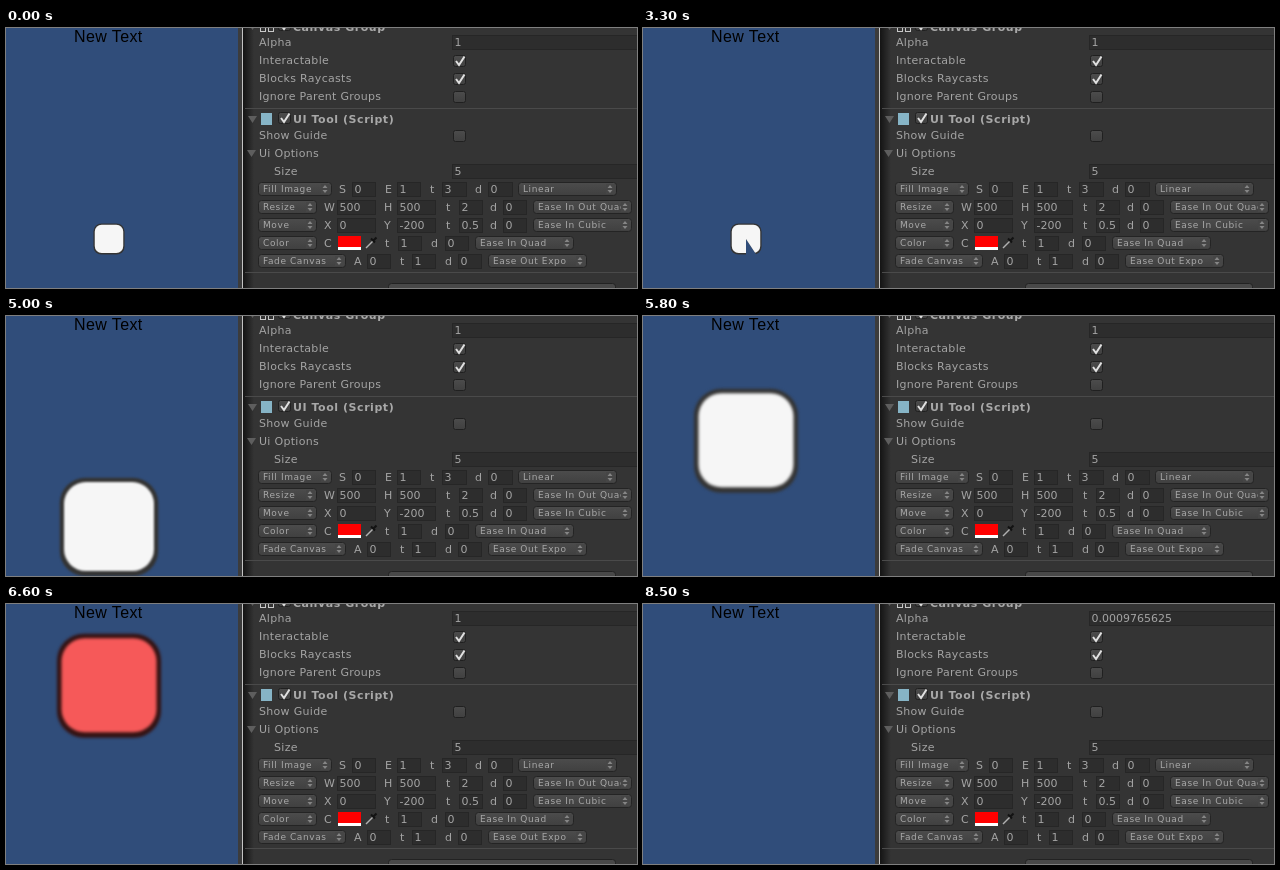
Write an HTML page that moves like this. It is 631 px wide and 260 px high and loops after 8600 ms.

```html
<!DOCTYPE html>
<html lang="en">
<head>
<meta charset="utf-8">
<title>UI Tool</title>
<style>
html, body { margin: 0; width: 100%; height: 100%; overflow: hidden; background: #343434; }
svg { display: block; }
text { white-space: pre; }
.scene { font: 16px "Liberation Sans", Arial, sans-serif; fill: #000; letter-spacing: .4px; }
.label, .value { font: 11px "DejaVu Sans", sans-serif; fill: #a4a4a4; }
.label { letter-spacing: .3px; }
.title { font: bold 11px "DejaVu Sans", sans-serif; fill: #a8a8a8; letter-spacing: .55px; }
.mini { font: 9px "DejaVu Sans", sans-serif; fill: #a8a8a8; letter-spacing: .6px; }
</style>
</head>
<body>
<svg id="stage" width="631" height="260" viewBox="0 0 631 260">
  <defs>
    <filter id="soft" filterUnits="userSpaceOnUse" x="-65" y="-65" width="130" height="130" color-interpolation-filters="sRGB">
      <feGaussianBlur stdDeviation="1.4"/>
    </filter>
    <clipPath id="wedge"><path id="sector"/></clipPath>
    <linearGradient id="face" x2="0" y2="1">
      <stop stop-color="#4c4c4c"/><stop offset="1" stop-color="#404040"/>
    </linearGradient>
    <linearGradient id="shade">
      <stop stop-color="#141414"/><stop offset="1" stop-color="#343434"/>
    </linearGradient>
  </defs>
  <rect width="232" height="260" fill="#304d7a"/>
  <text class="scene" x="68" y="14">New Text</text>
  <g id="button">
    <rect id="rim" x="-52" y="-52" width="104" height="104" rx="27" filter="url(#soft)"/>
    <rect id="body" x="-47.5" y="-47.5" width="95" height="94" rx="23" filter="url(#soft)"/>
  </g>
  <g id="panel"></g>
</svg>
<script>
const LOOP = 8600, STEP = 100;
const $ = id => document.getElementById(id);
const panel = $('panel');

function add(tag, attrs, content) {
  const el = document.createElementNS('http://www.w3.org/2000/svg', tag);
  for (const key in attrs) el.setAttribute(key, attrs[key]);
  if (content !== undefined) el.textContent = content;
  return panel.appendChild(el);
}
const rect = (x, y, width, height, fill, more) => add('rect', { x, y, width, height, fill, ...more });
const text = (x, y, content, kind = 'label') => add('text', { x, y, class: kind }, content);

function field(x, y, w, value) {
  rect(x + .5, y + .5, w - 1, 14, '#2d2d2d', { stroke: '#262626' });
  return text(x + 2.5, y + 11, value, 'value');
}

function checkbox(x, y, on) {
  rect(x + .5, y + .5, 12, 11, 'url(#face)', { stroke: '#202020', rx: 2 });
  if (on) add('path', { d: `M${x + 3} ${y + 6}l3 4L${x + 11.5} ${y + 1.5}`, fill: 'none', stroke: '#e0e0e0', 'stroke-width': 2 });
}

function popup(x, mid, w, label) {
  rect(x + .5, mid - 6.5, w - 1, 13, 'url(#face)', { stroke: '#242424', rx: 3 });
  text(x + 5, mid + 3, label, 'mini');
  const cx = x + w - 7;
  rect(cx - 4, mid - 5, 9, 10, '#464646');
  add('path', { d: `M${cx - 2.5} ${mid - 1}l2.5 -3l2.5 3zM${cx - 2.5} ${mid + 1}l2.5 3l2.5 -3z`, fill: '#858585' });
}

const foldout = (x, y) => add('path', { d: `M${x} ${y}h9l-4.5 7z`, fill: '#5e5e5e' });

// cells: [label, label x, field x, field width, value]
function optionRow(mid, name, nameWidth, cells, ease, easeX) {
  popup(252, mid, nameWidth, name);
  for (const [label, lx, fx, w, value] of cells) {
    text(lx, mid + 4, label);
    if (w) field(fx, mid - 7, w, value);
  }
  popup(easeX, mid, 99, ease);
}

function buildPanel() {
  rect(232, 0, 399, 260, '#343434');
  rect(232, 0, 4, 260, '#3c3c3c');
  rect(236, 0, 1, 260, '#c4c4c4');
  rect(237, 0, 11, 260, 'url(#shade)');

  foldout(242, -5);
  for (const x of [254.5, 262.5]) rect(x, -3.5, 5, 7, 'none', { stroke: '#c8c8c8' });
  checkbox(272, -9, true);
  text(287, 3, 'Canvas Group', 'title');

  text(253, 18, 'Alpha');
  const alpha = field(446, 7, 190, '1');
  [['Interactable', 32, true], ['Blocks Raycasts', 50, true],
   ['Ignore Parent Groups', 68, false], ['Show Guide', 107, false]].forEach(([label, mid, on]) => {
    text(253, mid + 4, label);
    checkbox(447, mid - 5, on);
  });

  rect(239, 80, 392, 1, '#4a4a4a');
  foldout(242, 88);
  rect(255, 85, 11, 12, '#86b4c6');
  checkbox(272, 84, true);
  text(287, 95, 'UI Tool (Script)', 'title');

  foldout(241, 122);
  text(253, 129, 'Ui Options');
  text(268, 147, 'Size');
  field(446, 136, 190, '5');

  optionRow(161, 'Fill Image', 74, [['S', 333, 346, 24, '0'], ['E', 379, 391, 24, '1'],
    ['t', 424, 436, 25, '3'], ['d', 469, 482, 25, '0']], 'Linear', 512);
  optionRow(179, 'Resize', 59, [['W', 318, 331, 39, '500'], ['H', 378, 391, 39, '500'],
    ['t', 440, 453, 24, '2'], ['d', 484, 497, 24, '0']], 'Ease In Out Quad', 527);
  optionRow(197, 'Move', 59, [['X', 318, 331, 39, '0'], ['Y', 378, 391, 39, '-200'],
    ['t', 440, 453, 24, '0.5'], ['d', 484, 497, 24, '0']], 'Ease In Cubic', 527);
  optionRow(215, 'Color', 59, [['C', 318], ['t', 379, 392, 24, '1'],
    ['d', 425, 439, 24, '0']], 'Ease In Quad', 469);
  optionRow(233, 'Fade Canvas', 88, [['A', 348, 361, 24, '0'], ['t', 394, 406, 24, '1'],
    ['d', 439, 452, 24, '0']], 'Ease Out Expo', 482);

  rect(332, 208, 23, 11, '#ff0000');
  rect(332, 219, 23, 3, '#fff');
  add('path', { d: 'M360 220l7 -7', stroke: '#b0b0b0', 'stroke-width': 1.4 });
  add('path', { d: 'M365 210.5l4 4M367 213l3.5 -3.5', stroke: '#121212', 'stroke-width': 2 });

  rect(239, 244, 392, 1, '#4a4a4a');
  rect(382.5, 255.5, 227, 20, '#484848', { stroke: '#222', rx: 3 });
  return alpha;
}

const alphaText = buildPanel();

const span = (t, start, length) => Math.min(1, Math.max(0, (t - start) / length));
const inOutQuad = p => p < .5 ? 2 * p * p : 1 - 2 * (1 - p) ** 2;
const fade = p => p > 0 ? 2 ** (-10 * p) : 1;
const tint = (level, red) => `rgb(${level},${level * (1 - red)},${level * (1 - red)})`;

// Radial fill, clockwise from the bottom.
function setFill(p) {
  const button = $('button');
  if (p >= 1) return button.removeAttribute('clip-path');
  const a = p * 2 * Math.PI, r = 90;
  $('sector').setAttribute('d',
    `M0 0V${r}A${r} ${r} 0 ${p > .5 ? 1 : 0} 1 ${-r * Math.sin(a)} ${r * Math.cos(a)}Z`);
  button.setAttribute('clip-path', 'url(#wedge)');
}

function draw(ms) {
  const t = Math.floor(ms % LOOP / STEP) * STEP;
  const scale = .3 + .7 * inOutQuad(span(t, 3550, 1800));
  const y = 211 - 129.3 * span(t, 5407, 450) ** 3;
  const red = span(t, 5880, 900) ** 2;

  setFill(t < 900 ? 1 : span(t, 850, 2700));
  $('button').setAttribute('transform', `translate(103 ${y}) scale(${scale})`);
  $('button').setAttribute('opacity', fade(span(t, 6780, 900)));
  $('rim').setAttribute('fill', tint(52, red));
  $('body').setAttribute('fill', tint(246, red));

  // The inspector repaints late and skips every fourth step.
  const shown = t % 400 ? t : t - STEP;
  alphaText.textContent = String(Number(fade(span(shown, 6900, 900)).toPrecision(7)));
}

const begin = performance.now();
function tick() {
  draw(performance.now() - begin);
  requestAnimationFrame(tick);
}
tick();
</script>
</body>
</html>
```
